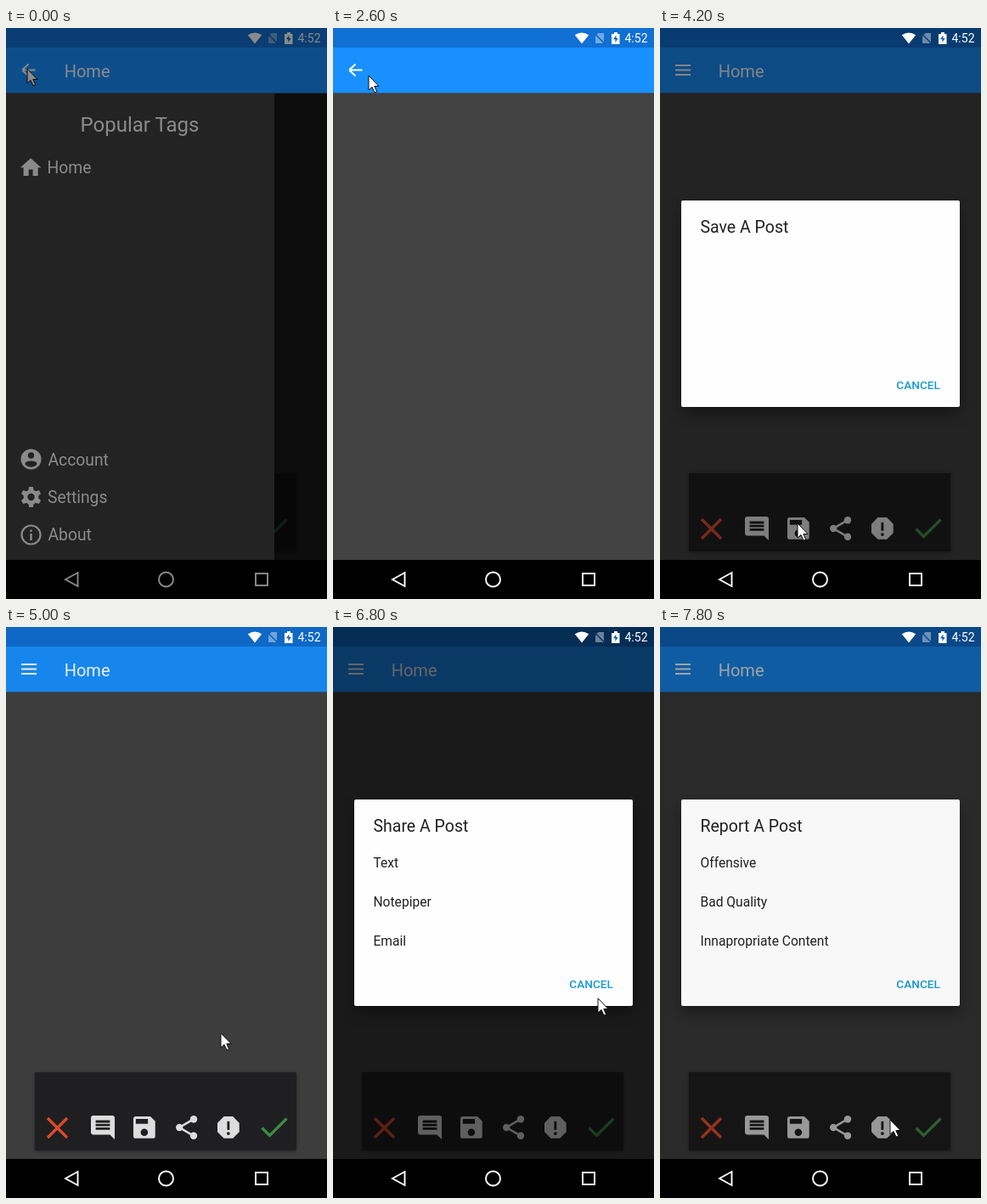
An HTML page that plays this animation: 378x672 px, repeating every 8 s.

```html
<!DOCTYPE html>
<html lang="en">
<head>
<meta charset="utf-8">
<title>Post app walkthrough</title>
<style>
html, body { margin: 0; width: 100%; height: 100%; overflow: hidden; background: #000; }
svg { display: block; width: 100%; height: 100%; font-family: Roboto, sans-serif; }
#dialog { filter: drop-shadow(0 8px 8px rgba(0,0,0,.35)); }
#card { filter: drop-shadow(0 1px 2px rgba(0,0,0,.4)); }
.line { fill: none; stroke: #fff; stroke-width: 1.9; }
</style>
</head>
<body>
<svg viewBox="0 0 378 672">
  <rect width="378" height="672" fill="#424242"/>
  <rect width="378" height="23" fill="#1070d4"/>
  <rect y="23" width="378" height="53.4" fill="#1890ff"/>

  <circle id="ripple" cx="27" cy="50" r="20" fill="#fff"/>
  <path id="menu" class="line"/>
  <text id="title" x="68.7" y="58" font-size="20" fill="#fff">Home</text>

  <g id="card">
    <rect x="34" y="524" width="308" height="92" rx="1" fill="#212123"/>
    <path d="M49 578L72 601M72 578L49 601" fill="none" stroke="#e8502f" stroke-width="3.4"/>
    <path d="M301.5 589.5L310.5 598.5L330.5 578.5" fill="none" stroke="#43964a" stroke-width="3.2"/>
    <g fill="#eee">
      <g transform="translate(97.2 572.2) scale(1.4)">
        <path d="M4 2H20Q22 2 22 4V22L18 18H4Q2 18 2 16V4Q2 2 4 2Z"/>
        <path d="M6 7H18M6 10H18M6 13H18" stroke="#212123" stroke-width="2"/>
      </g>
      <g transform="translate(145.7 571.8) scale(1.43)">
        <path d="M5 3H17L21 7V19Q21 21 19 21H5Q3 21 3 19V5Q3 3 5 3Z"/>
        <path d="M5 5H15V9H5Z" fill="#212123"/>
        <circle cx="12" cy="16" r="3" fill="#212123"/>
      </g>
      <g transform="translate(195.8 572.2) scale(1.4)">
        <path d="M18 5L6 12L18 19" fill="none" stroke="#eee" stroke-width="1.8"/>
        <circle cx="18" cy="5" r="3"/><circle cx="6" cy="12" r="3"/><circle cx="18" cy="19" r="3"/>
      </g>
      <g transform="translate(244.7 571.8) scale(1.43)">
        <path d="M8.3 3H15.7L21 8.3V15.7L15.7 21H8.3L3 15.7V8.3Z"/>
        <path d="M11 7H13V14H11Z" fill="#212123"/>
        <circle cx="12" cy="17" r="1.3" fill="#212123"/>
      </g>
    </g>
  </g>

  <rect id="scrim" y="77" width="378" height="549"/>
  <g id="drawer" fill="#fff" font-size="19.3">
    <rect y="77" width="316" height="549" fill="#404042"/>
    <text x="157.5" y="122" font-size="24" text-anchor="middle">Popular Tags</text>
    <path transform="translate(14.5 149.5) scale(1.22)" d="M10 20V14H14V20H19V12H22L12 3L2 12H5V20Z"/>
    <text x="48.5" y="171">Home</text>
    <circle cx="29.5" cy="507.5" r="12"/>
    <g fill="#404042">
      <circle cx="29.5" cy="503" r="3.7"/>
      <path d="M22.3 513Q23 509.5 29.5 509.5T36.7 513Q34 516.8 29.5 516.8T22.3 513Z"/>
    </g>
    <text x="49.5" y="515">Account</text>
    <g id="gear" transform="translate(29.5 552)">
      <circle r="6.5" fill="none" stroke="#fff" stroke-width="4.6"/>
    </g>
    <text x="49" y="559">Settings</text>
    <circle cx="29.5" cy="596.5" r="11" fill="none" stroke="#fff" stroke-width="2.2"/>
    <path d="M28.3 595H30.7V603H28.3ZM28.3 590.5H30.7V593H28.3Z"/>
    <text x="49.5" y="603">About</text>
  </g>

  <rect id="dim" width="378" height="626"/>
  <g id="dialog" fill="#212121" font-size="15.6">
    <rect x="25" y="203" width="328" height="243" rx="2" fill="#fefefe"/>
    <text id="heading" x="47.5" y="241" font-size="19.5"></text>
    <text class="row" x="47.5" y="283"></text>
    <text class="row" x="47.5" y="329"></text>
    <text class="row" x="47.5" y="375"></text>
    <text x="278.3" y="425" font-size="13.6" font-weight="500" fill="#159bd2">CANCEL</text>
  </g>

  <g fill="#fff">
    <path d="M293 18.5L284.8 8.3Q293 2.5 301.2 8.3Z"/>
    <g opacity=".4">
      <path d="M312.5 6H319V18H309V9.5Z"/>
      <path d="M308 6.5L320 18.5" stroke="#0b4a90" stroke-width="1.5"/>
    </g>
    <path d="M328 7H331V5H335V7H337.5V19H328Z"/>
    <path d="M333.4 8.5L330 13.3H332.4V17L335.7 12H333.4Z" fill="#1260b4"/>
    <text x="343.5" y="17" font-size="14">4:52</text>
  </g>
  <rect y="626" width="378" height="46"/>
  <g class="line">
    <path d="M70 649L84.5 641V657Z"/>
    <circle cx="188.5" cy="649" r="8.5"/>
    <rect x="294" y="642" width="14" height="14"/>
  </g>
  <path id="cursor" d="M0 0V17L4 13.5L7 20L9.7 19L6.8 12.5H12Z" fill="#fff" stroke="#111"/>
  <rect id="fade" width="378" height="672"/>
</svg>
<script>
const LOOP = 8000, STEP = 200, FADE = 500;
const $ = id => document.getElementById(id);
const rows = document.querySelectorAll('.row');

const spot = (x, y) => ({ x, y });
const menu = spot(25, 48), comment = spot(114, 587), save = spot(162, 583);
const cancel = spot(304, 420), share = spot(212, 585), report = spot(271, 580);

// Where the pointer is at key times; it rests between equal spots
const route = [
  [0, menu], [600, spot(163, 359)], [1000, comment], [1400, comment],
  [2600, spot(42, 56)], [2800, menu], [3000, menu], [3600, spot(139, 444)],
  [3800, save], [4200, save], [4600, cancel], [5000, spot(253, 478)],
  [5400, share], [6000, share], [6800, spot(312, 437)], [7000, cancel],
  [7600, report], [LOOP, report]
];

const dialogs = [
  { open: 3800, close: 4560, heading: 'Save A Post', items: [] },
  { open: 5450, close: 6950, heading: 'Share A Post', items: ['Text', 'Notepiper', 'Email'] },
  { open: 7500, close: LOOP, heading: 'Report A Post',
    items: ['Offensive', 'Bad Quality', 'Innapropriate Content'] }
];

const clamp = v => Math.max(0, Math.min(1, v));
const mix = (a, b, k) => a + (b - a) * k;
const ramp = (t, from, span) => clamp((t - from) / span);
const smooth = k => k * k * (3 - 2 * k);

const alpha = (id, v) => $(id).setAttribute('opacity', v);
const move = (id, v) => $(id).setAttribute('transform', v);

// Hamburger at 0, back arrow at 1
function menuIcon(m) {
  const x1 = mix(-9, .5, m), x2 = mix(9, 7.8, m), y1 = mix(5.5, 7, m), y2 = mix(5.5, .3, m);
  const mid = mix(9, 7.5, m);
  $('menu').setAttribute('d',
    `M${x1} ${-y1}L${x2} ${-y2}M${-mid} 0H${mid}M${x1} ${y1}L${x2} ${y2}`);
  move('menu', `translate(27 49.5) rotate(${-180 * m})`);
}

function movePointer(t) {
  const i = route.findIndex(([time]) => time > t);
  const [t0, a] = route[i - 1], [t1, b] = route[i];
  const k = (t - t0) / (t1 - t0);
  move('cursor', `translate(${mix(a.x, b.x, k)} ${mix(a.y, b.y, k)})`);
}

function drawDialog(t) {
  const box = dialogs.find(d => t <= d.close + FADE);
  const shown = ramp(t, box.open, FADE) - ramp(t, box.close, FADE);
  alpha('dim', .6 * shown);
  alpha('dialog', clamp((shown - .12) * 2.03));
  $('heading').textContent = box.heading;
  rows.forEach((row, i) => row.textContent = box.items[i] || '');
}

function draw(t) {
  const page = t >= 1400 && t < 3000;
  const open = 1 - smooth(ramp(t, 100, 500));
  alpha('title', page ? 0 : 1);
  alpha('card', page ? 0 : 1);
  alpha('ripple', .09 * Math.sin(Math.PI * ramp(t, 0, 800)));
  alpha('scrim', .63 * open);
  alpha('fade', .46 * (1 - ramp(t, 0, 400)));
  move('drawer', `translate(${-318 * (1 - open)} 0)`);
  menuIcon(page ? 1 : 1 - smooth(ramp(t, 0, 660)));
  drawDialog(t);
  movePointer(t);
}

for (let i = 0; i < 6; i++) {
  $('gear').insertAdjacentHTML('beforeend',
    `<path d="M-3.4 -7L-2.3 -12H2.3L3.4 -7Z" transform="rotate(${i * 60})"/>`);
}

const start = performance.now();
function tick() {
  const t = (performance.now() - start) % LOOP;
  draw(Math.floor(t / STEP) * STEP);
  requestAnimationFrame(tick);
}
draw(0);
requestAnimationFrame(tick);
</script>
</body>
</html>
```
